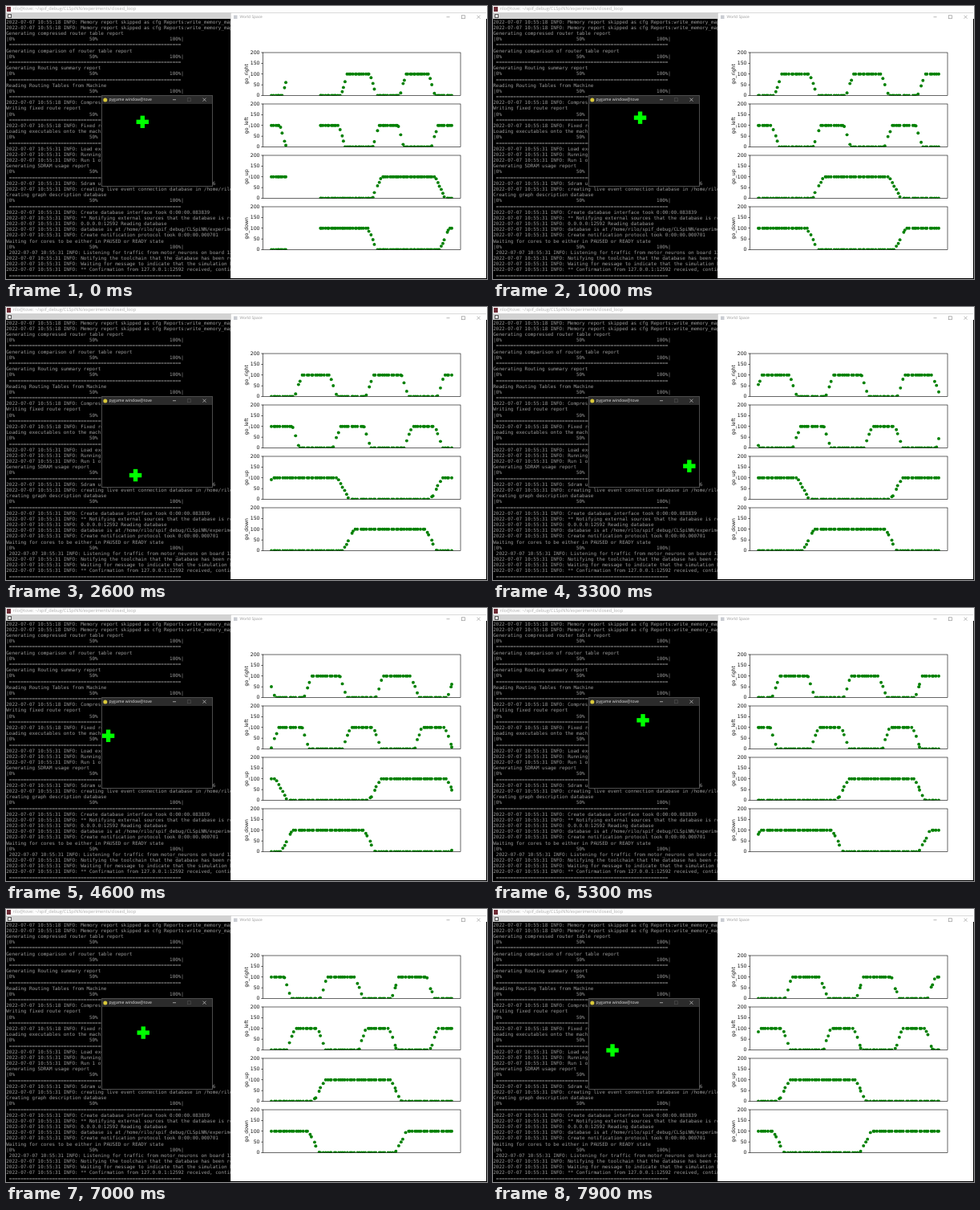
An HTML page with a canvas for the animation above (8000 ms loop, 600 by 340 pixels).

```html
<!DOCTYPE html>
<html lang="en">
<head>
<meta charset="utf-8">
<title>Closed loop</title>
<style>
html, body { margin: 0; width: 600px; height: 340px; overflow: hidden; background: #fff; }
canvas { display: block; }
</style>
</head>
<body>
<canvas id="stage" width="600" height="340"></canvas>
<script>
const MONO = '"DejaVu Sans Mono", monospace';
const SANS = '"DejaVu Sans", sans-serif';
const UI = '"Open Sans", "Noto Sans", sans-serif';
const LOOP = 8000, STEP = 100;

const stage = document.getElementById('stage').getContext('2d');
const backdrop = document.createElement('canvas');
backdrop.width = 600;
backdrop.height = 340;

const clamp = (v, a, b) => Math.min(b, Math.max(a, v));
const mod = (v, n) => ((v % n) + n) % n;
const wrap = (v, n) => mod(v + n / 2, n) - n / 2;
const noise = n => {
  const v = Math.sin(n * 127.1 + 31.7) * 43758.5453;
  return (v - Math.floor(v)) * 2 - 1;
};

function rect(c, x, y, w, h, color) {
  c.fillStyle = color;
  c.fillRect(x, y, w, h);
}

function label(c, text, x, y, size, family, color, align = 'left') {
  c.font = `${size}px ${family}`;
  c.textRendering = 'geometricPrecision';
  c.textAlign = align;
  c.textBaseline = 'middle';
  c.fillStyle = color;
  c.fillText(text, x, y);
}

// ---- terminal ----
const BAR = '|0%'.padEnd(29) + '50%'.padEnd(28) + '100%|';
const RULE = ' ' + '='.repeat(60);
const log = (text, time = '10:55:31') => `2022-07-07 ${time} INFO: ${text}`;
const early = text => log(text, '10:55:18');
const MEMORY = early('Memory report skipped as cfg Reports:write_memory_map');
const LINES = [
  MEMORY, MEMORY,
  'Generating compressed router table report', BAR, RULE,
  'Generating comparison of router table report', BAR, RULE,
  'Generating Routing summary report', BAR, RULE,
  'Reading Routing Tables from Machine', BAR, RULE,
  early('Compressed tables'),
  'Writing fixed route report', BAR, RULE,
  early('Fixed routes'),
  'Loading executables onto the machine', BAR, RULE,
  log('Load executables onto machine'),
  log('Running for all time'),
  log('Run 1 of 1'),
  'Generating SDRAM usage report', BAR, RULE,
  log('Sdram usage report per chip took 0:00:00.005206'),
  log('creating live event connection database in /home/rilo/spif'),
  'Creating graph description database', BAR, RULE,
  log('Create database interface took 0:00:00.083839'),
  log('** Notifying external sources that the database is ready'),
  log('0.0.0.0:12592 Reading database'),
  log('database is at /home/rilo/spif_debug/CLSpiNN/experiments'),
  log('Create notification protocol took 0:00:00.000701'),
  'Waiting for cores to be either in PAUSED or READY state', BAR,
  ' ' + log('Listening for traffic from motor_neurons on board 127'),
  log('Notifying the toolchain that the database has been read'),
  log('Waiting for message to indicate that the simulation has'),
  log('** Confirmation from 127.0.0.1:12592 received, continuing'),
  RULE
];

function drawTerminal(c) {
  rect(c, 0, 0, 600, 8, '#fdfdfd');
  rect(c, 1, 1, 5, 6, '#6d2b35');
  label(c, 'rilo@tove: ~/spif_debug/CLSpiNN/experiments/closed_loop', 8.5, 4, 5.6, UI, '#b0b0b0');
  rect(c, 0, 8, 280, 8, '#d2d2d2');
  rect(c, 2, 10, 5, 5, '#555');
  rect(c, 3, 11, 3, 3, '#eee');
  rect(c, 0, 16, 600, 324, '#000');
  c.save();
  c.beginPath();
  c.rect(0, 16, 280, 324);
  c.clip();
  LINES.forEach((text, i) => label(c, text, 0.3, 20.2 + i * 7.18, 5.94, MONO, '#9c9c9c'));
  c.restore();
}

// ---- windows ----
function buttons(c, xs, y, r, colors) {
  const [a, b, d] = xs;
  c.lineWidth = 0.7;
  const path = (color, ...pts) => {
    c.strokeStyle = color;
    c.beginPath();
    pts.forEach(([x, py], i) => i % 2 ? c.lineTo(x, py) : c.moveTo(x, py));
    c.stroke();
  };
  path(colors[0], [a - r, y], [a + r, y]);
  c.strokeStyle = colors[1];
  c.strokeRect(b - r, y - r, 2 * r, 2 * r);
  path(colors[0], [d - r, y - r], [d + r, y + r], [d - r, y + r], [d + r, y - r]);
}

function drawGame(c) {
  rect(c, 119, 111, 139, 114, '#4c4c4c');
  rect(c, 120, 112, 137, 10, '#2b2b2b');
  rect(c, 120, 122, 137, 102, '#000');
  c.fillStyle = '#d9c83a';
  c.beginPath();
  c.arc(123.8, 117, 2.5, 0, 7);
  c.fill();
  label(c, 'pygame window@tove', 128.5, 116.7, 5.1, UI, '#e0e0e0');
  buttons(c, [210, 228.5, 247.5], 116.7, 2, ['#ccc', '#4c4c4c']);
}

const PLOT = { x: 320.5, w: 246.5, h: 53.5 };
const GRAPHS = [
  { name: 'go_right', top: 58, rise: 14.5, fall: 59, period: 89.7, ramp: 9 },
  { name: 'go_left', top: 122, rise: 63, fall: 101.5, period: 89.7, ramp: 9 },
  { name: 'go_up', top: 186, rise: -115, fall: -18.5, period: 213.5, ramp: 14 },
  { name: 'go_down', top: 250, rise: -12, fall: 92, period: 213.5, ramp: 14 }
];

function drawPlotWindow(c) {
  rect(c, 280, 8, 319, 331, '#fff');
  rect(c, 280, 8, 319, 0.7, '#ccc');
  rect(c, 280, 8, 0.7, 331, '#ccc');
  rect(c, 284, 11.5, 4.5, 4.5, '#c9ccd2');
  label(c, 'World Space', 291.5, 13.8, 4.9, UI, '#999');
  buttons(c, [551.5, 570.5, 589.5], 13.7, 2, ['#999', '#999']);
  for (const g of GRAPHS) {
    for (let v = 0; v <= 200; v += 50) {
      const y = g.top + PLOT.h * (1 - v / 200);
      rect(c, PLOT.x - 2.2, y - 0.3, 2.2, 0.6, '#000');
      label(c, v, PLOT.x - 4, y + 0.3, 6.2, SANS, '#111', 'right');
    }
    c.save();
    c.translate(300.5, g.top + PLOT.h / 2);
    c.rotate(-Math.PI / 2);
    label(c, g.name, 0, 0, 6.2, SANS, '#111', 'center');
    c.restore();
  }
}

// ---- motion ----
// The simulation runs at an uneven pace: [ms, simulated time].
const PACE = [[0, 0], [1000, 38], [2000, 89.7], [3300, 151.3], [4600, 196.3], [6000, 240], [7900, 294.1]];

function simTime(ms) {
  const last = PACE.length - 1;
  const slope = i => {
    const a = PACE[Math.max(0, i - 1)], b = PACE[Math.min(last, i + 1)];
    return (b[1] - a[1]) / (b[0] - a[0]);
  };
  let i = 0;
  while (i < last - 1 && ms > PACE[i + 1][0]) i++;
  const [t0, u0] = PACE[i], [t1, u1] = PACE[i + 1];
  const d = t1 - t0, k = (ms - t0) / d, q = 1 - k;
  return u0 * (1 + 2 * k) * q * q + u1 * k * k * (3 - 2 * k)
    + d * (slope(i) * k * q * q - slope(i + 1) * k * k * q);
}

// Share of full rate: a periodic pulse with sloped sides.
function rate(g, s) {
  const off = Math.abs(wrap(s - (g.rise + g.fall) / 2, g.period));
  return clamp(0.5 + ((g.fall - g.rise) / 2 - off) / g.ramp, 0, 1);
}

const SPACING = 2.8, COUNT = 82;

function sampleTime(i) {
  const s = i * SPACING + noise(i) * 1.15;
  return s < -205 ? s - 48 : s; // recording paused here
}

function drawGraph(c, g, newest) {
  const start = sampleTime(newest - COUNT + 1);
  const span = sampleTime(newest) - start;
  c.save();
  c.beginPath();
  c.rect(PLOT.x, g.top, PLOT.w, PLOT.h);
  c.clip();
  c.fillStyle = '#008000';
  for (let i = newest - COUNT + 1; i <= newest; i++) {
    const s = sampleTime(i);
    let v = rate(g, s);
    if (v > 0 && v < 1) v = clamp(v + noise(i + g.top) * 0.05, 0, 1);
    c.beginPath();
    c.arc(331 + 225 * (s - start) / span, g.top + PLOT.h * (1 - v / 2), 1.95, 0, 7);
    c.fill();
  }
  c.restore();
  c.strokeStyle = '#000';
  c.lineWidth = 0.6;
  c.strokeRect(PLOT.x, g.top, PLOT.w, PLOT.h);
}

function drawCross(c, u) {
  const x = 126.5 + 119 * Math.abs(wrap(u - 16.5, 89.7)) / 44.85;
  const y = clamp(125.3 + 0.865 * Math.abs(wrap(u - 22, 213.5)), 129.2, 216);
  c.save();
  c.beginPath();
  c.rect(120, 122, 137, 102);
  c.clip();
  rect(c, x - 7.7, y - 2.7, 15.4, 5.4, '#00ff00');
  rect(c, x - 2.7, y - 7.7, 5.4, 15.4, '#00ff00');
  c.restore();
}

function draw(ms) {
  const u = simTime(Math.floor(ms / STEP) * STEP);
  stage.drawImage(backdrop, 0, 0);
  drawCross(stage, u);
  for (const g of GRAPHS) drawGraph(stage, g, Math.floor(u / SPACING));
}

const back = backdrop.getContext('2d');
drawTerminal(back);
drawGame(back);
drawPlotWindow(back);

const begin = performance.now();
function tick(now) {
  draw(Math.max(0, now - begin) % LOOP);
  requestAnimationFrame(tick);
}
draw(0);
requestAnimationFrame(tick);
</script>
</body>
</html>
```
